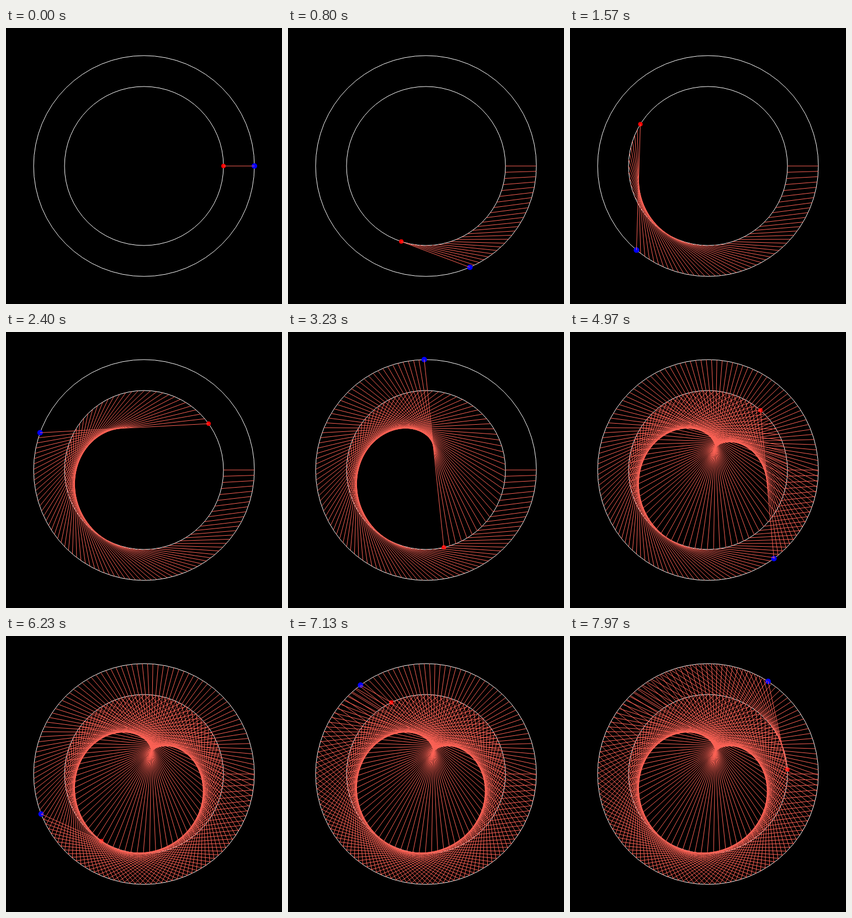
Write an HTML page that moves like this. It is 500 by 500 pixels and loops after 8000 ms.

```html
<!DOCTYPE html>
<html lang="en">
<head>
<meta charset="utf-8">
<title>Orbit chords</title>
<style>
  html, body { margin: 0; width: 100%; height: 100%; overflow: hidden; background: #000; }
  svg { display: block; width: 100%; height: 100%; }
</style>
</head>
<body>
<svg id="stage" viewBox="0 0 500 500"></svg>
<script>
const LOOP = 8000;
const STEPS = 240;
const CENTER = 250;
const outer = { r: 200, step: 2.774, dot: 5, color: '#00f' };
const inner = { r: 144, step: 4.505, dot: 4, color: '#f00' };
const stage = document.getElementById('stage');

function add(tag, attrs) {
  const el = document.createElementNS('http://www.w3.org/2000/svg', tag);
  for (const name in attrs) el.setAttribute(name, attrs[name]);
  return stage.appendChild(el);
}

function place(orbit, k) {
  const a = k * orbit.step * Math.PI / 180;
  return [CENTER + orbit.r * Math.cos(a), CENTER + orbit.r * Math.sin(a)];
}

for (const { r } of [outer, inner]) {
  add('circle', { cx: CENTER, cy: CENTER, r, fill: 'none', stroke: '#fff', 'stroke-width': 1 });
}
for (const orbit of [outer, inner]) {
  orbit.el = add('circle', { r: orbit.dot, fill: orbit.color });
}

// One chord per step, revealed as the planets move on.
const chords = Array.from({ length: STEPS }, (_, k) => {
  const [x1, y1] = place(outer, k);
  const [x2, y2] = place(inner, k);
  return add('line', { x1, y1, x2, y2, stroke: '#fc6255', 'stroke-width': 1 });
});

let shown = -1;

function draw(t) {
  // 30 steps a second, each starting on the nearest 10 ms.
  const k = Math.floor((Math.floor(t / 10) + 0.5) * 0.3);
  if (k === shown) return;
  shown = k;
  for (const orbit of [outer, inner]) {
    const [x, y] = place(orbit, k);
    orbit.el.setAttribute('cx', x);
    orbit.el.setAttribute('cy', y);
  }
  chords.forEach((line, i) => { line.style.display = i <= k ? '' : 'none'; });
}

const start = performance.now();
function tick() {
  draw((performance.now() - start) % LOOP);
  requestAnimationFrame(tick);
}
tick();
</script>
</body>
</html>
```
